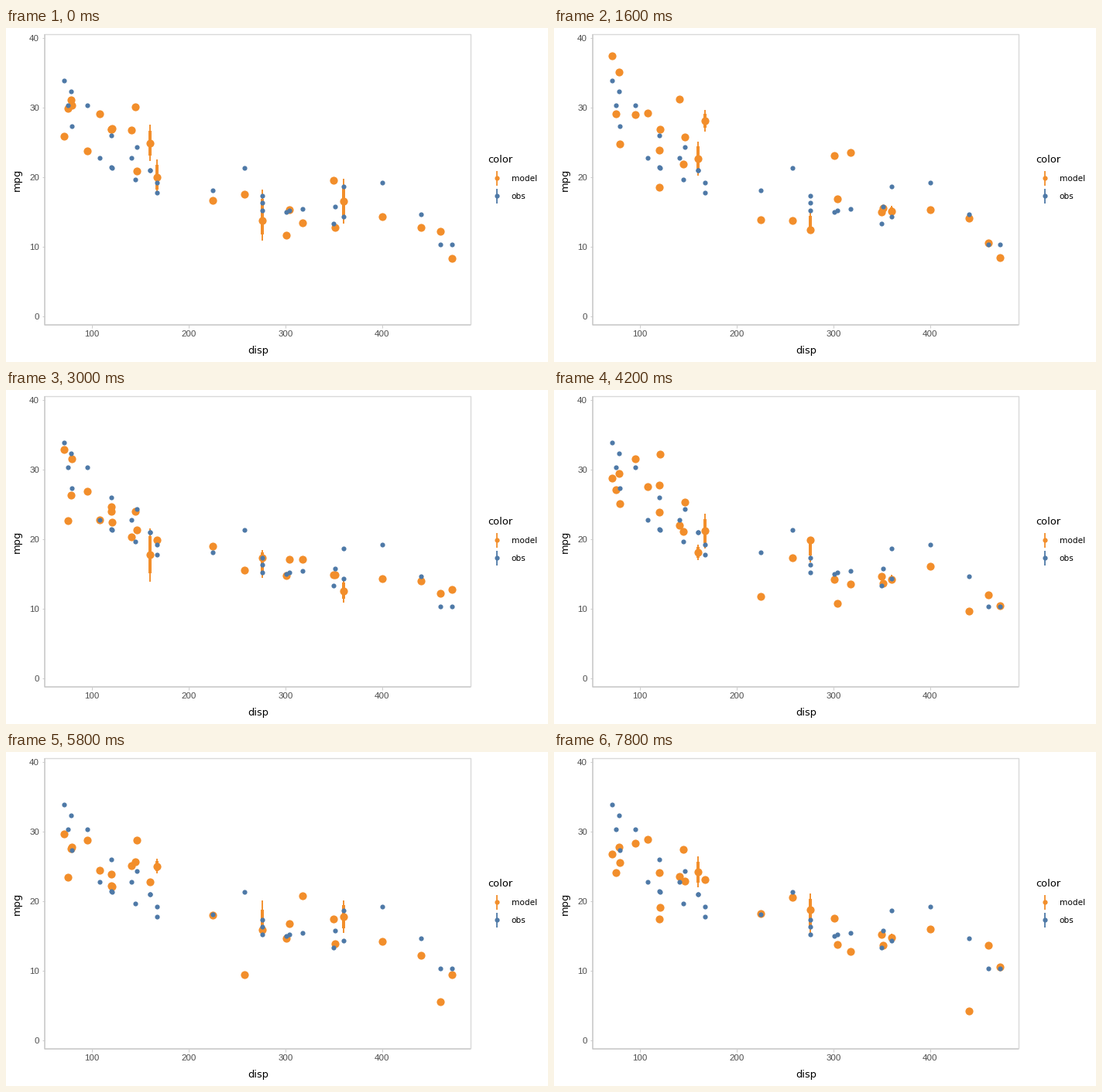
A matplotlib script that plays this animation: 700 by 432 pixels, repeating every 8000 ms.

```python
import numpy as np
import matplotlib.pyplot as plt
from matplotlib.animation import FuncAnimation
from matplotlib.collections import LineCollection

W, H, DPI = 700, 432, 100
FRAMES, STEP = 40, 200
PX = 72 / DPI
ORANGE, BLUE = "#F28E2B", "#4E79A7"
SIGMA = 3.2

# mtcars: engine displacement with the mpg of every car that has it
CARS = {
    71.1: [33.9], 75.7: [30.4], 78.7: [32.4], 79: [27.3], 95.1: [30.4],
    108: [22.8], 120.1: [21.5], 120.3: [26], 121: [21.4], 140.8: [22.8],
    145: [19.7], 146.7: [24.4], 160: [21, 21], 167.6: [19.2, 17.8],
    225: [18.1], 258: [21.4], 275.8: [16.4, 17.3, 15.2], 301: [15],
    304: [15.2], 318: [15.5], 350: [13.3], 351: [15.8], 360: [18.7, 14.3],
    400: [19.2], 440: [14.7], 460: [10.4], 472: [10.4],
}
disp, mpg = np.array([(d, m) for d, cars in CARS.items() for m in cars]).T
levels = np.array(list(CARS))
slope, intercept = np.polyfit(np.log(disp), mpg, 1)


def px_x(d):
    return 110.8 + (d - 100) * 1.25


def px_y(m):
    return 373.1 - 9 * m


def predict(i):
    """One posterior predictive draw of mpg for every car."""
    rng = np.random.default_rng(100 + i)
    draw = intercept + slope * np.log(disp) + rng.normal(0, SIGMA, len(disp))
    return np.clip(draw, 3, 37.5)


fig = plt.figure(figsize=(W / DPI, H / DPI), dpi=DPI, facecolor="white")
ax = fig.add_axes([0, 0, 1, 1])
ax.set_xlim(0, W)
ax.set_ylim(H, 0)
ax.axis("off")


def line(xs, ys, color, width):
    ax.plot(xs, ys, color=color, lw=width * PX, solid_capstyle="butt", zorder=1)


def label(x, y, text, size, font="DejaVu Sans", color="black", va="baseline", **kw):
    ax.text(x, y, text, fontsize=size * PX, family=font, color=color, va=va, **kw)


def tick_label(x, y, value, ha):
    label(x, y, str(value), 11.5, "Liberation Sans", "#4D4D4D", ha=ha)


def dots(xs, ys, diameter, color, z):
    return ax.scatter(xs, ys, s=(diameter * PX) ** 2, c=color, linewidths=0, zorder=z)


def bars(width):
    coll = LineCollection([], colors=ORANGE, linewidths=width * PX,
                          capstyle="butt", zorder=3)
    ax.add_collection(coll, autolim=False)
    return coll


# panel, axes and ticks
L, T, R, B = 50, 7.9, 600, 384
line([L, R, R], [T, T, B], "#D9D9D9", 1.4)
line([L, L, R], [T, B, B], "#C4C4C4", 1.5)
for d in range(100, 500, 100):
    x = px_x(d)
    line([x, x], [B, B + 3.5], "#CCCCCC", 1)
    tick_label(x, 399, d, "center")
for m in range(0, 50, 10):
    y = px_y(m)
    line([L - 3.5, L], [y, y], "#CCCCCC", 1)
    tick_label(43.2, y + 3.8, m, "right")
label(325.3, 420.7, "disp", 13, ha="center")
label(14, 196, "mpg", 13, ha="center", va="center", rotation=90)

# legend
label(622.5, 174, "color", 13)
for y, name, color in ((194.3, "model", ORANGE), (217.4, "obs", BLUE)):
    line([634.3, 634.3], [y - 9.2, y + 9.2], color, 1.8)
    dots([634.3], [y], 6.2, color, 2)
    label(652.6, y + 4, name, 10.5)

# data: medians with 66% and 95% intervals, observations on top
xs = px_x(levels)
intervals = [(bars(1.9), 0.95), (bars(4), 0.66)]
model = dots(xs, xs, 10.2, ORANGE, 4)
dots(px_x(disp), px_y(mpg), 6.2, BLUE, 5)


def update(i):
    draw = predict(i)
    groups = [draw[disp == d] for d in levels]
    model.set_offsets([(x, px_y(np.median(g))) for x, g in zip(xs, groups)])
    for coll, width in intervals:
        ends = [0.5 - width / 2, 0.5 + width / 2]
        coll.set_segments([[(x, px_y(q)) for q in np.quantile(g, ends)]
                           for x, g in zip(xs, groups) if len(g) > 1])
    return [model] + [coll for coll, _ in intervals]


anim = FuncAnimation(fig, update, frames=FRAMES, interval=STEP, repeat=True,
                     repeat_delay=0, blit=False)
plt.show()
```
